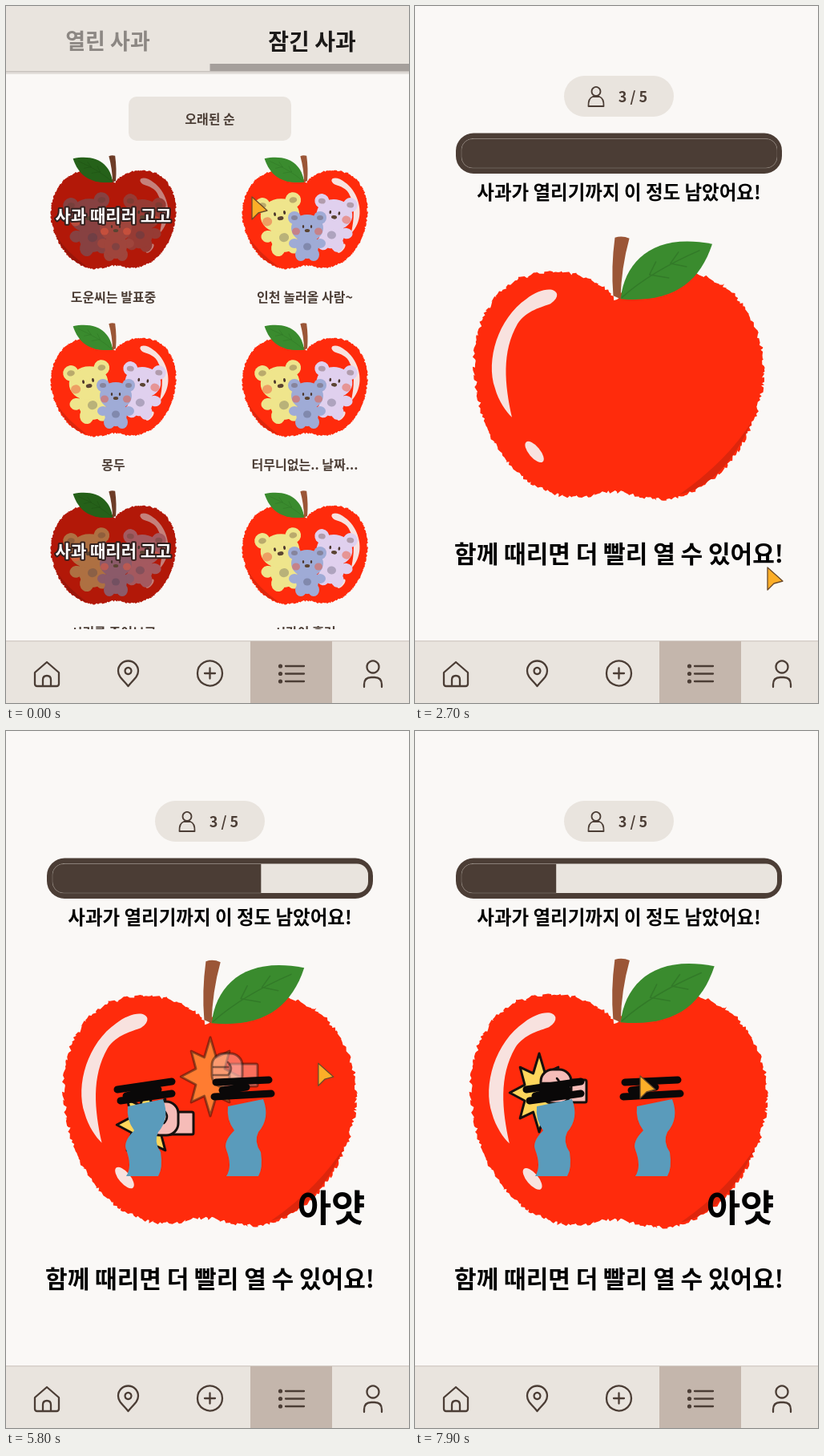
An HTML page with a canvas for the animation above (8 s loop, 503 px wide and 869 px high).

```html
<!DOCTYPE html>
<html lang="ko">
<head>
<meta charset="utf-8">
<style>
html, body { margin: 0; width: 100%; height: 100%; overflow: hidden; background: #faf8f6; }
canvas { display: block; }
</style>
</head>
<body>
<canvas width="503" height="869"></canvas>
<script>
const LOOP = 8000, OPEN = 900, JOIN = 2650;
const FONT = '"Noto Sans CJK KR", "Noto Sans CJK JP", "Noto Sans CJK", sans-serif';
const PAGE = '#faf8f6', SAND = '#e9e4de', BROWN = '#4b3d35';
const c = document.querySelector('canvas').getContext('2d');

// Cursor stops: time, x, y
const cursorStops = [
  [0, 307, 238], [350, 300, 248], [800, 215, 377], [1800, 382, 516], [2700, 440, 700],
  [3300, 440, 885], [4600, 478, 885], [5000, 478, 420], [5400, 395, 415],
  [6600, 375, 412], [7300, 350, 420], [7900, 281, 430], [8000, 270, 432]
];
// Hits: time, bar level afterwards, offset of the fist
const hits = [
  [3900, .9, 90, 20], [4350, .805, 30, -30], [5400, .7, 100, -20], [5750, .6, 20, 40],
  [6030, .5, 57, -45], [7300, .4, 110, 10], [7750, .3, 0, 0]
];

const art = {
  shade: 'M75 157Q130 145 166 65Q135 115 75 157Z',
  leaf: 'M2-86C8-135 45-168 116-154C100-105 65-80 2-86Z',
  vein: 'M4-88Q40-120 100-146M38-116L46-132M38-116L62-112M64-130L74-144M64-130L84-126',
  stem: 'M-5-162Q4-165 13-161Q3-125 2-86L-7-90Q-10-125-5-162Z',
  shine: 'M-77-92C-80-102-100-98-115-86C-150-62-166-10-154 25C-150 40-140 55-133 61C-142 20-146-20-126-55C-115-72-95-76-85-80Q-76-86-77-92Z',
  tear: 'M152 468L196 459Q205 483 190 500Q184 512 193 525Q196 545 190 555L150 555Q158 543 150 522Q146 512 160 498Q150 485 152 468Z',
  brows: 'M139 447L207 437M143 461L207 452M150 455L190 447M262 438L328 435M260 456L331 452M270 448L300 444',
  cursor: 'M0 0L19 17L8 20L0 28Z',
  icons: 'M36 831L51 818L66 831V845Q66 848 63 848H39Q36 848 36 845ZM46 848V840Q46 835 51 835T56 840V848' +
    'M152.5 848C146 840 140 836 140 829A12.5 12.5 0 0 1 165 829C165 836 159 840 152.5 848Z' +
    'M156.5 829A4 4 0 1 1 156.5 828.9M270 832A15.5 15.5 0 1 1 270 831.9M248 832H261M254.5 825.5V838.5' +
    'M349 823H372M349 832.5H372M349 842H372' +
    'M465.5 824A7.5 7.5 0 1 1 465.5 823.9M447 849V846Q447 837 456 837H460Q469 837 469 846V849',
  user: 'M231.5 106.5A5.5 5.5 0 1 1 231.5 106.4M216.5 125Q216 115 222 113H230Q236 115 235.5 125Z'
};
for (const k in art) art[k] = new Path2D(art[k]);
art.body = crayon('M-4-86C-30-115-65-122-95-119C-150-112-180-65-180-10C-180 70-140 150-62 160' +
  'C-40 161-25 154-5 154C15 154 30 163 55 163C125 160 180 75 180 0C178-52 150-110 85-119C45-120 15-105-4-86Z');

// Roughens an outline with seeded jitter
function crayon(d) {
  const line = document.createElementNS('http://www.w3.org/2000/svg', 'path');
  line.setAttribute('d', d);
  const rough = new Path2D();
  let seed = 7;
  const jitter = () => ((seed = seed * 16807 % 2147483647) / 2147483647 - .5) * 4.5;
  for (let s = 0; s < line.getTotalLength(); s += 2.5) {
    const p = line.getPointAtLength(s);
    rough.lineTo(p.x + jitter(), p.y + jitter());
  }
  rough.closePath();
  return rough;
}

const bright = { body: '#ff2b0c', shade: '#dd260c', leaf: '#3a8b2e', vein: '#327a28', stem: '#9b5637', shine: '#f8e2df',
  bears: ['#efe58c', '#9fabd6', '#e0d0ee'] };
const dim = { body: '#b21808', shade: '#9a1508', leaf: '#256119', vein: '#1f5415', stem: '#6d3c27', shine: '#c5817b' };
const dimRed = { ...dim, bears: ['#874141', '#9f453c', '#963b34'] };
const dimMix = { ...dim, bears: ['#ae7042', '#8b5a69', '#a4595f'] };

const clamp = v => Math.max(0, Math.min(1, v));

function fill(path, color) {
  c.fillStyle = color;
  c.fill(path);
}
function stroke(path, color, width) {
  c.strokeStyle = color;
  c.lineWidth = width;
  c.stroke(path);
}
function box(x, y, w, h, r, color) {
  c.beginPath();
  c.roundRect(x, y, w, h, r);
  c.fillStyle = color;
  c.fill();
}
function oval(x, y, rx, ry, color, turn = 0) {
  c.beginPath();
  c.ellipse(x, y, rx, ry, turn, 0, 7);
  c.fillStyle = color;
  c.fill();
}
function text(str, x, y, size, color, outline) {
  c.font = `700 ${size}px ${FONT}`;
  c.textAlign = 'center';
  c.textBaseline = 'middle';
  if (outline) {
    c.strokeStyle = outline;
    c.lineWidth = 4;
    c.strokeText(str, x, y);
  }
  c.fillStyle = color;
  c.fillText(str, x, y);
}
function at(x, y, sx, sy, draw) {
  c.save();
  c.translate(x, y);
  c.scale(sx, sy);
  draw();
  c.restore();
}

function apple(p) {
  fill(art.body, p.body);
  fill(art.shade, p.shade);
  fill(art.stem, p.stem);
  fill(art.leaf, p.leaf);
  stroke(art.vein, p.vein, 1.5);
  fill(art.shine, p.shine);
  oval(-105, 104, 7, 16, p.shine, -.7);
}

function bear(x, y, size, turn, color) {
  at(x, y, size, size, () => {
    c.rotate(turn);
    for (const s of [-1, 1]) {
      oval(s * 16, -13, 8, 8, color);
      oval(s * 16, 19, 7, 6, color);
      oval(s * 8, 33, 7, 8, color);
    }
    oval(0, 22, 14, 16, color);
    oval(0, 0, 20, 17, color);
    for (const s of [-1, 1]) {
      oval(s * 16, -13, 4, 3, 'rgba(90,60,50,.35)');
      oval(s * 14, 4, 5, 4.5, 'rgba(235,90,60,.5)');
      oval(s * 5, -2, 1.2, 2, '#4a352c');
    }
    oval(0, 3, 3.2, 2, '#5b4432');
    oval(0, 23, 5, 4.5, 'rgba(60,60,80,.3)');
  });
}

function card(x, y, label, p) {
  at(x, y, -.434, .434, () => apple(p));
  const [left, mid, right] = p.bears;
  bear(x - 31, y + 4, 1.22, -.18, left);
  bear(x + 37, y + 3, 1.12, .14, right);
  bear(x + 3, y + 20, 1, 0, mid);
  if (p !== bright) text('사과 때리러 고고', x, y + 4, 21, '#fff', '#33211f');
  text(label, x, y + 106, 16, BROWN);
}

function listPage(t) {
  const q = clamp((t - 400) / 500), zoom = 1 + .1 * (1 - (1 - q) ** 2);
  at(254.5, 393, zoom, zoom, () => {
    c.translate(-254.5, -393);
    box(-30, 81, 563, 4, 0, '#e3dfdb');
    box(-30, -5, 563, 86, 0, SAND);
    box(-30, 81, 563, 1.5, 0, '#c9c4bf');
    box(254.5, 72, 280, 9, 0, '#a59f9b');
    text('열린 사과', 127, 44, 27, '#8c8783');
    text('잠긴 사과', 382, 44, 28, '#1c1a19');
    box(153, 113, 203, 55, 10, SAND);
    text('오래된 순', 254.5, 141, 16, BROWN);
    c.beginPath();
    c.rect(0, 168, 503, 609);
    c.clip();
    card(134, 257, '도운씨는 발표중', dimRed);
    card(373, 257, '인천 놀러올 사람~', bright);
    card(134, 466, '몽두', bright);
    card(373, 466, '터무니없는.. 날짜...', bright);
    card(134, 675, '시리를 주어보고', dimMix);
    card(373, 675, '시간이 흘러', bright);
  });
}

function fist(dx, dy) {
  c.save();
  c.translate(155 + dx, 451 + dy);
  c.beginPath();
  for (let i = 0; i < 16; i++) {
    const a = i * Math.PI / 8 - Math.PI / 2, r = i % 2 ? 26 : i % 4 ? 45 : 49;
    c.lineTo(r * Math.cos(a) * .75, r * Math.sin(a));
  }
  c.closePath();
  c.fillStyle = '#ffd65c';
  c.fill();
  c.strokeStyle = '#16100e';
  c.lineWidth = 3;
  c.stroke();
  box(24, -16, 35, 28, 2, '#f6bcb8');
  c.stroke();
  box(2, -29, 38, 42, 15, '#f6bcb8');
  c.stroke();
  stroke(new Path2D('M4-12H22M4-2H22M22-18Q30-10 22-2'), '#16100e', 2.5);
  c.restore();
}

function face() {
  fill(art.tear, '#5a9bbb');
  at(125, 0, 1, 1, () => fill(art.tear, '#5a9bbb'));
  stroke(art.brows, '#0a0808', 9);
  text('아얏', 406, 594, 46, '#000');
}

function barLevel(t) {
  let level = 1;
  for (const [time, next] of hits) level += (next - level) * clamp((t - time) / 130);
  return level;
}

function hitPage(t) {
  box(186, 87, 137, 51, 25.5, SAND);
  stroke(art.user, BROWN, 1.8);
  text(t < JOIN ? '2 / 5' : '3 / 5', 272, 113, 18, BROWN);

  box(51, 158.5, 407, 50.5, 22, BROWN);
  box(58, 165.5, 394, 36.5, 14, SAND);
  c.save();
  c.beginPath();
  c.rect(57, 164, 1 + 394 * barLevel(t), 39);
  c.clip();
  box(58, 165.5, 394, 36.5, 14, BROWN);
  c.strokeStyle = 'rgba(233,228,222,.3)';
  c.lineWidth = .7;
  c.stroke();
  c.restore();
  text('사과가 열리기까지 이 정도 남았어요!', 254.5, 232, 23.5, '#000');

  // One pulse per second
  const phase = (((t - 3640) / 1000) % 1 + 1) % 1;
  const tri = 1 - Math.abs(1 - 2 * phase);
  const pulse = 1 + .052 * (tri + (1 - Math.cos(Math.PI * tri)) / 2) / 2;
  at(254.5, 451.5, pulse, pulse, () => apple(bright));

  for (const [time, , dx, dy] of hits) {
    const age = t - time;
    if (age < 0 || age > 580) continue;
    c.globalAlpha = clamp((580 - age) / 380);
    fist(dx, dy);
    c.globalAlpha = 1;
  }
  if (hits.some(([time]) => t >= time && t < time + 400)) face();
  text('함께 때리면 더 빨리 열 수 있어요!', 254.5, 683, 30, '#000');
}

function nav() {
  box(0, 791, 503, 78, 0, SAND);
  box(0, 791, 503, 1.5, 0, '#d6d0ca');
  box(305, 792, 102, 77, 0, '#c4b6ac');
  stroke(art.icons, BROWN, 2.3);
  for (const y of [823, 832.5, 842]) oval(342.5, y, 2.6, 2.6, BROWN);
}

function cursor(t) {
  const i = cursorStops.findIndex(s => s[0] > t);
  const [t0, x0, y0] = cursorStops[i - 1], [t1, x1, y1] = cursorStops[i];
  const q = (t - t0) / (t1 - t0), k = q * q * (3 - 2 * q);
  at(x0 + (x1 - x0) * k, y0 + (y1 - y0) * k, 1, 1, () => {
    fill(art.cursor, '#fcae28');
    stroke(art.cursor, '#6b4a2a', 1.3);
  });
}

function frame(now) {
  const t = now % LOOP;
  c.lineCap = c.lineJoin = 'round';
  c.fillStyle = PAGE;
  c.fillRect(0, 0, 503, 869);
  if (t < OPEN) listPage(t);
  else hitPage(t);
  nav();
  cursor(t);
  requestAnimationFrame(frame);
}
frame(0);
</script>
</body>
</html>
```
